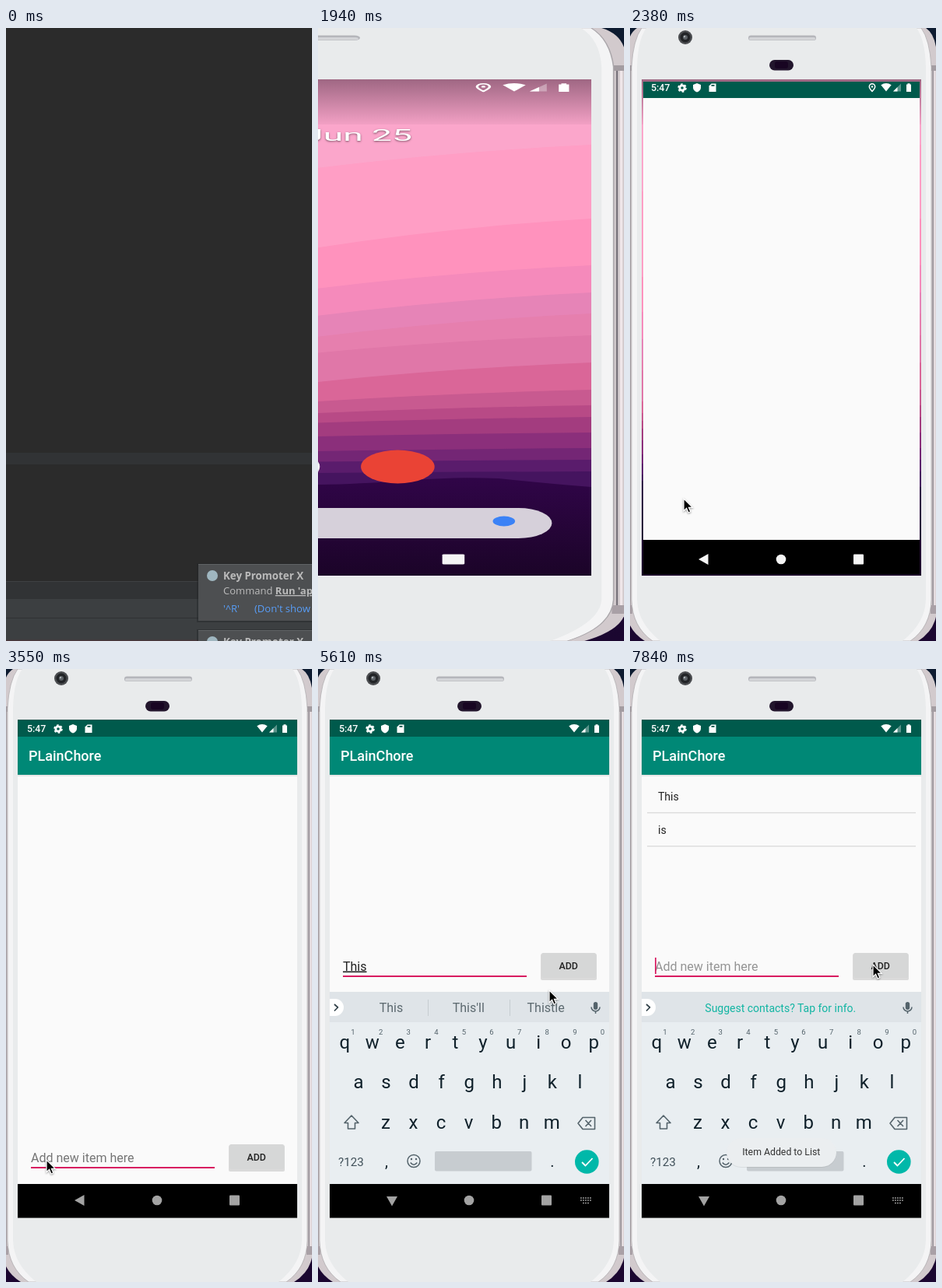
Animation, 393 px wide and 788 px high, one loop 7.99 s. Source, as an HTML page:

```html
<!DOCTYPE html>
<html lang="en">
<head>
<meta charset="utf-8">
<title>Todo app demo</title>
<style>
html, body { margin: 0; width: 100%; height: 100%; overflow: hidden; background: #2b2b2b; }
svg { display: block; width: 393px; height: 788px; font-family: Roboto, sans-serif; }
.ide { font-family: "Open Sans", sans-serif; font-size: 13px; fill: #bbb; }
.mid { text-anchor: middle; }
text { white-space: pre; }
</style>
</head>
<body>
<svg id="stage" xmlns="http://www.w3.org/2000/svg" viewBox="0 0 393 788"></svg>
<script>
const rect = (x, y, w, h, fill, extra = '') =>
  `<rect x="${x}" y="${y}" width="${w}" height="${h}" fill="${fill}" ${extra}/>`;
const path = (d, fill, extra = '') => `<path d="${d}" fill="${fill}" ${extra}/>`;
const line = (d, color, width = 1.5, extra = '') =>
  path(d, 'none', `stroke="${color}" stroke-width="${width}" stroke-linejoin="round" ${extra}`);
const circle = (x, y, r, fill, extra = '') =>
  `<circle cx="${x}" cy="${y}" r="${r}" fill="${fill}" ${extra}/>`;
const text = (x, y, size, fill, str, extra = '') =>
  `<text x="${x}" y="${y}" font-size="${size}" fill="${fill}" ${extra}>${str}</text>`;
const mid = (x, y, size, fill, str, extra = '') =>
  text(x, y, size, fill, str, `class="mid" ${extra}`);
const group = (id, body, extra = '') => `<g id="${id}" ${extra}>${body}</g>`;

// Editor window with notifications

const popup = (id, y) => group(id,
  rect(245, y - 1, 160, 76, '#222527', 'opacity=".45"') +
  rect(247, y, 160, 73, '#4d4f51') +
  rect(247, y, 160, 1, '#606365') +
  circle(265, y + 15, 7, '#9fb6c0') +
  `<g class="ide"><text x="279" y="${y + 20}" font-weight="700" font-size="13.3">Key Promoter X</text>
   <text x="279" y="${y + 39}">Command <tspan font-weight="700" text-decoration="underline">Run 'app'</tspan></text>
   <text x="279" y="${y + 62}" fill="#589df6">'^R'</text>
   <text x="319" y="${y + 62}" fill="#589df6">(Don't show again)</text></g>`);

const editor = () => group('editor',
  rect(0, 0, 393, 788, '#2b2b2b') +
  rect(0, 546, 393, 15, '#313335') +
  rect(0, 711, 393, 23, '#313335') +
  rect(0, 711, 393, 1, '#3f4143') +
  rect(0, 734, 393, 54, '#3c3f41') +
  rect(0, 758, 393, 1, '#2f3133') +
  rect(0, 786.5, 393, 1.5, '#49383c') +
  popup('popup', 689) + popup('popup2', 774));

// Phone body, mirrored around x = 194.5

const shell = () => {
  const side =
    path('M190 0H380Q392 8 394 32V750Q392 774 370 788H190Z', '#d2cacd') +
    line('M389 52V742', '#77727a', 1) + line('M391.5 52V742', '#efe6e9', 1.5) +
    rect(386, 48, 8, 7, '#a39ca1') + rect(386, 742, 8, 11, '#a9a0a6') +
    path('M190 0H374Q385 15 387 50V735Q386 770 360 788H190', '#f4f4f5',
      'stroke="#aaa6aa" stroke-width=".7"') +
    path('M190 0H368Q379 15 380 50V735Q379 765 350 788H190Z', '#e9ebec');
  return rect(-500, 0, 1000, 788, 'url(#outside)') + side +
    `<g transform="matrix(-1 0 0 1 389 0)">${side}</g>` +
    circle(71, 12, 9, '#4a4c4f') + circle(71, 12, 6.5, '#222427') +
    circle(71, 12, 3, '#5c6166') + circle(70, 11, 1.2, '#a9b0b4') +
    rect(152, 9.5, 87, 6.5, '#b5b6bb', 'rx="3.2"') + rect(153, 12, 85, 3.5, '#d4d5d8', 'rx="1.7"') +
    rect(179, 41, 31, 13.5, '#22152c', 'rx="6.7"') + rect(186, 43, 17, 9, '#180522', 'rx="3"');
};

// Wallpaper bands: height at the right edge, drop towards the left, colour
const bands = [
  [66, 0, '#fba6cb'], [150, 60, '#ff9ec5'], [245, 75, '#ff92bd'], [305, 60, '#f58abb'],
  [340, 60, '#e684b7'], [367, 60, '#e67fae'], [395, 45, '#e077a8'], [430, 50, '#da6698'],
  [465, 30, '#c85a90'], [485, 20, '#b84a86'], [500, 15, '#a33c7f'], [520, 10, '#8b2f7b'],
  [540, 8, '#742675'], [555, 5, '#5a1c6c'], [570, 4, '#45145f']
];

const home = () =>
  `<g clip-path="url(#screenClip)">` +
  bands.map(([y, drop, c]) =>
    path(`M374 ${y}Q290 ${y + drop * .15} 214 ${y + drop * .5}T15 ${y + drop}V704H374Z`, c)).join('') +
  path('M15 582Q110 592 214 587C255 586 285 575 320 579Q350 586 374 590V704H15Z', 'url(#hill)') +
  rect(15, 66, 359, 58, 'url(#scrim)') + '</g>' +
  mid(194.5, 145, 21, '#fff', 'Tuesday, Jun 25', 'style="text-shadow:0 1px 3px #0008"') +
  circle(60, 564, 21.5, '#2f7de1') + circle(127, 564, 21.5, '#2f7de1') +
  circle(194, 564, 21.5, '#f5f5f5') + circle(261, 564, 21.5, '#ea4335') +
  rect(38, 617, 313, 39, '#d6d0da', 'rx="19.5"') +
  circle(56, 636, 8, '#3b82f6') + circle(323, 634, 6.5, '#3b82f6');

const statusLeft = () =>
  text(27, 81.3, 12.4, '#fff', '5:47', 'font-weight="500"') +
  circle(67, 77, 3.2, 'none', 'stroke="#fff" stroke-width="2.8"') +
  circle(67, 77, 5, 'none', 'stroke="#fff" stroke-width="1.6" stroke-dasharray="2.7 2.536"') +
  path('M86 71L91 73V76.5Q91 80.5 86 82.5Q81 80.5 81 76.5V73Z', '#fff') +
  path('M104.5 71.5H110.5V82H101.5V74.5Z', '#fff') + rect(104.5, 73, 4, 1.8, '#00574b');

const statusRight = () =>
  group('pin', line('M311 81.5Q307.3 77.5 307.3 75.4A3.7 3.7 0 0 1 314.7 75.4Q314.7 77.5 311 81.5Z', '#fff', 1.5) +
    circle(311, 75.4, 1.2, '#fff')) +
  path('M322.3 73.2Q329 68.8 335.7 73.2L329 81.6Z', '#fff') +
  path('M348 71.5V81.5H338Z', '#fff', 'opacity=".35"') + path('M343.5 76V81.5H338Z', '#fff') +
  path('M355 72.5H356.5V71.2H359.5V72.5H361V82H355Z', '#fff');

const navBar = () => group('nav',
  path('M88 683L100.5 676V690Z', 'currentColor', 'id="back"') +
  path('M88 678H102L95 690.5Z', 'currentColor', 'id="down"') +
  circle(194, 683, 6.3, 'currentColor') + rect(287, 676.5, 13, 13, 'currentColor', 'rx="1"') +
  line('M337 680H351M337 683H351M340 686.5H348', 'currentColor', 1.6, 'id="kbIcon" stroke-dasharray="1.8 1.2"'));

// Keyboard

const ink = '#10212b', soft = '#54636b';

const keyRow = (letters, x, y) => [...letters].map((ch, i) =>
  mid(x + i * 35.55, y, 24, ink, ch)).join('');

const keyboard = () => group('keyboard',
  rect(15, 415, 359, 247, '#e9eef1') + rect(15, 415, 359, 39, '#dfe4e8') +
  path('M15 424H22A11 11 0 0 1 22 446H15Z', '#fff') + line('M21 431L25.5 435L21 439.5', '#33434b', 1.7) +
  group('suggestions', '') +
  rect(353.8, 428, 5.4, 10, soft, 'rx="2.7"') + line('M351 434.5A5.5 5.5 0 0 0 362 434.5M356.5 440V443', soft) +
  keyRow('qwertyuiop', 34.3, 488) + keyRow('asdfghjkl', 52, 539) + keyRow('zxcvbnm', 87, 590.5) +
  [...'1234567890'].map((n, i) => mid(45 + i * 35.6, 470, 9.5, soft, n)).join('') +
  line('M43 574L52 583.5H47.5V591H38.5V583.5H34Z', soft, 1.6) +
  line('M334 584L340 576.5H355.5V591.5H340ZM343.5 580L351 588M351 580L343.5 588', soft, 1.6) +
  text(26, 638.5, 15.2, '#41515a', '?123') + mid(88, 640, 20, ink, ',') + mid(301, 640, 20, ink, '.') +
  circle(123, 632.5, 8, 'none', `stroke="${soft}" stroke-width="1.5"`) +
  circle(120, 630, 1.2, soft) + circle(126, 630, 1.2, soft) + line('M118.7 634.5Q123 640 127.3 634.5', soft) +
  rect(150, 620, 124.5, 25.5, '#c7ccd0', 'rx="2"') +
  circle(345.3, 633.5, 15.3, '#00b8a9') + line('M339 634L343.5 638.5L352.5 629', '#fff', 1.8));

// Application window

const app = () => group('app',
  group('splash', rect(17, 69, 355, 633, '#000') + rect(17, 69, 355, 21, '#005a4c') + rect(17, 90, 355, 568, '#fafafa')) +
  group('main',
    rect(15, 66, 359, 638, '#000') + rect(15, 66, 359, 21, '#005a4c') + rect(15, 87, 359, 575, '#fafafa') +
    rect(15, 136, 359, 2, '#e6e6e6') + rect(15, 87, 359, 49, '#008876') +
    text(29, 118, 18, '#fff', 'PLainChore', 'font-weight="500"') + group('items', '') +
    group('entry', group('field', '') + rect(32, 640, 236, 2, '#d81b60') +
      rect(286, 612, 72, 34, '#000', 'rx="2" opacity=".13"') +
      rect(287, 611, 70, 32, '#d6d7d7', 'rx="2" id="button"') +
      mid(321.7, 632, 12.4, '#212121', 'ADD', 'font-weight="500"')) +
    `<g clip-path="url(#keysClip)">${keyboard()}</g>`));

const toast = () => group('toast',
  rect(124, 604, 141, 37, '#000', 'rx="18.5" opacity=".07"') + rect(124, 603, 141, 37, '#ebeef0', 'rx="18.5"') +
  mid(194.3, 625, 12.3, '#333', 'Item Added to List'));

const mouse = () => group('mouse',
  path('M0 0V15.8L3.6 12.4L6 18L8.8 16.8L6.4 11.3H11.3Z', '#000',
    'stroke="#fff" stroke-width="1.2" style="filter:drop-shadow(0 1px 1px #0006)"'));

const fade = (id, y1, y2, from, to) =>
  `<linearGradient id="${id}" gradientUnits="userSpaceOnUse" x1="0" x2="0" y1="${y1}" y2="${y2}">
   <stop ${from}/><stop offset="1" ${to}/></linearGradient>`;

const $ = id => document.getElementById(id);
$('stage').innerHTML = '<defs>' +
  fade('outside', 0, 788, 'stop-color="#0d1b30"', 'stop-color="#1b0630"') +
  fade('hill', 578, 704, 'stop-color="#300548"', 'stop-color="#1b0428"') +
  fade('scrim', 66, 124, 'stop-color="#201020" stop-opacity=".42"', 'stop-color="#201020" stop-opacity=".04"') +
  `<clipPath id="screenClip">${rect(15, 66, 359, 638, '#000')}</clipPath>
   <clipPath id="keysClip">${rect(15, 136, 359, 526, '#000')}</clipPath></defs>` +
  editor() +
  group('phone', shell() + home() + app() + statusLeft() + statusRight() + navBar() + toast() + mouse());

// Each step changes part of the state at its time

const prompt = 'Suggest contacts? Tap for info.';
const LOOP = 7990;
const steps = [
  [0, { phone: 0, popup: 1, wide: 0, splash: 0, main: 0, pin: 1, nav: '#f5f5f5', keys: 0, entryUp: 0, typed: '',
        caret: 0, hint: '#757575', suggest: prompt, items: [], press: 0, toast: 0, mouse: null }],
  [1040, { popup: .65 }], [1190, { popup: .3 }], [1340, { popup: 0 }],
  [1940, { phone: 1, wide: 1 }],
  [2080, { wide: 0 }],
  [2230, { splash: .92, mouse: [69, 605] }],
  [2380, { splash: 1 }],
  [2530, { splash: 1.0113 }],
  [2820, { main: 1, pin: 0, nav: '#a3a3a3' }],
  [2970, { mouse: [67, 609] }], [3110, { mouse: [62, 617] }],
  [3260, { mouse: [55, 627] }], [3400, { mouse: [52, 631] }],
  [3690, { keys: .5 }],
  [3840, { keys: 1, entryUp: 1 }],
  [4130, { typed: 'T', caret: 1 }], [4280, { caret: 0 }],
  [4720, { typed: 'Th' }],
  [5020, { typed: 'Thi', suggest: ['Thi', 'This', 'Third'] }],
  [5170, { typed: 'This', suggest: ['This', "This'll", 'Thistle'] }],
  [5320, { mouse: [110, 583] }], [5460, { mouse: [223, 483] }], [5610, { mouse: [297, 413] }],
  [5760, { mouse: [311, 384] }], [5910, { mouse: [312, 380] }],
  [6060, { press: 1 }],
  [6210, { press: 0, typed: '', caret: 1, hint: '#949494', suggest: prompt, items: ['This'] }],
  [6350, { toast: .5 }], [6500, { toast: .9 }], [6650, { toast: 1 }],
  [6940, { typed: 'is', caret: 0, suggest: ['is', "isn't", 'ISO'] }],
  [7540, { press: 1 }],
  [7690, { press: 0, typed: '', suggest: prompt, items: ['This', 'is'] }],
  [7840, { caret: 1 }]
];

const show = (id, opacity) => $(id).setAttribute('opacity', Number(opacity));
const move = (id, value) => $(id).setAttribute('transform', value);

function draw(s) {
  show('phone', s.phone);
  show('popup', s.popup);
  move('phone', s.wide ? 'matrix(2.2 0 0 1 -471.8 0)' : '');
  show('splash', Math.min(1, s.splash));
  move('splash', `translate(194.5 385) scale(${s.splash || 1}) translate(-194.5 -385)`);
  show('main', s.main);
  show('pin', s.pin);
  $('nav').setAttribute('color', s.nav);
  show('back', !s.entryUp);
  show('down', s.entryUp);
  show('kbIcon', s.entryUp);
  show('keyboard', s.keys > 0);
  move('keyboard', `translate(0 ${(1 - s.keys) * 247})`);
  move('entry', `translate(0 ${s.entryUp ? -246 : 0})`);
  $('button').setAttribute('fill', s.press ? '#c4c5c5' : '#d6d7d7');

  const caretX = 32 + s.typed.length * 9.5;
  $('field').innerHTML =
    (s.typed ? text(32, 633.5, 16, '#212121', s.typed, 'text-decoration="underline"')
             : text(32, 633.5, 16, s.hint, 'Add new item here')) +
    (s.caret ? rect(caretX, 617, 1.7, 21, '#d81b60') : '');
  $('items').innerHTML = s.items.map((item, i) =>
    text(36, 169 + 43 * i, 14, '#212121', item) + rect(22, 184 + 43 * i, 345, 1.5, '#dedede')).join('');
  $('suggestions').innerHTML = Array.isArray(s.suggest)
    ? s.suggest.map((word, i) => mid(94 + 99.3 * i, 441, 16, '#5c696f', word)).join('') +
      rect(141, 425, 1, 21, '#c6cdd1') + rect(246, 425, 1, 21, '#c6cdd1')
    : mid(193.3, 440.5, 14, '#12b5a3', s.suggest);

  show('toast', s.toast);
  show('mouse', !!s.mouse);
  if (s.mouse) move('mouse', `translate(${s.mouse})`);
}

const start = performance.now();
let shown = 0;

function tick() {
  const time = (performance.now() - start) % LOOP;
  const count = steps.filter(([at]) => at <= time).length;
  if (count !== shown) {
    shown = count;
    draw(Object.assign({}, ...steps.slice(0, count).map(([, change]) => change)));
  }
  requestAnimationFrame(tick);
}
tick();
</script>
</body>
</html>
```
